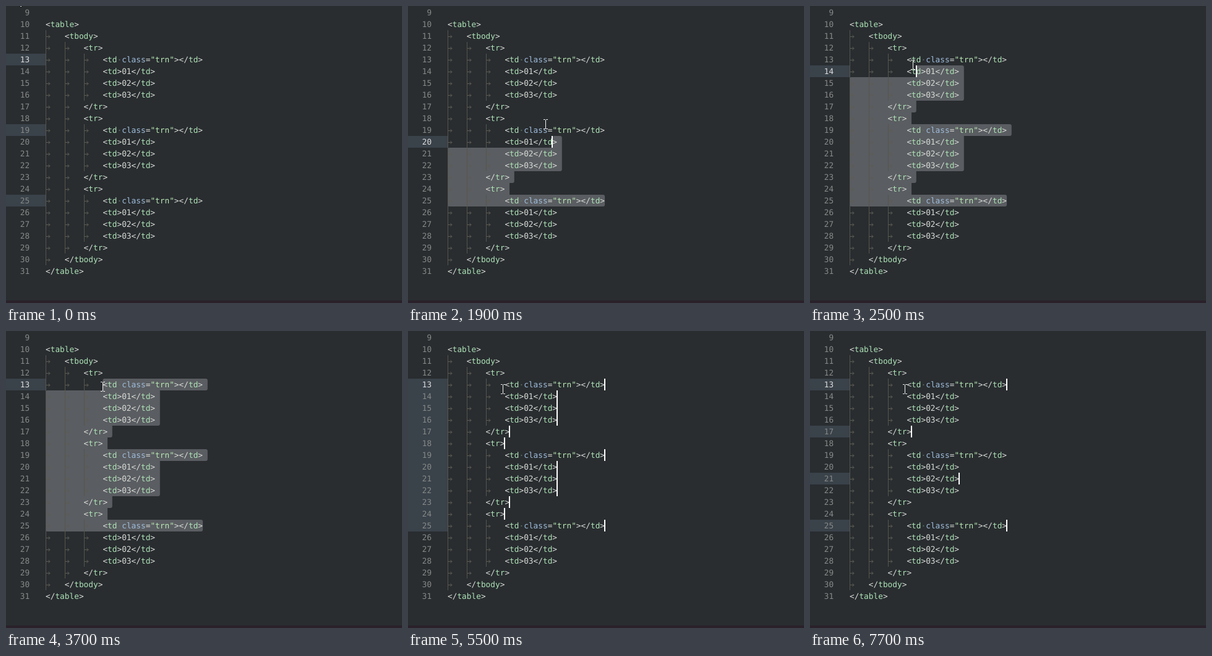
An HTML page for the animation above (8000 ms loop, 640 px wide and 480 px high).

```html
<!DOCTYPE html>
<html lang="en">
<head>
<meta charset="utf-8">
<title>Splitting a selection into cursors</title>
<style>
  html, body { margin: 0; width: 100%; height: 100%; overflow: hidden; background: #292d30; }
  svg { display: block; width: 640px; height: 480px; }
  text {
    font: 12.79px "DejaVu Sans Mono", "Noto Sans Mono", monospace;
    text-rendering: geometricPrecision;
    white-space: pre;
    fill: #d8dbd6;
  }
  .tag { fill: #aee4b7; }
  .attr { fill: #9fbcdc; }
  .str { fill: #b8e8b4; }
  .num { fill: #878a87; text-anchor: end; }
  .num.active { fill: #dedede; }
  .guide { fill: #56554c; }
  .tab { fill: none; stroke: #5d5c53; }
  .dot { fill: #62706a; }
  #gutter { fill: #3a424a; }
  #selection { fill: #5a5d61; }
  #carets { fill: #fff; }
  #beam { fill: none; stroke: #f4f4f4; }
  #arrow { fill: #fff; stroke: #111; }
</style>
</head>
<body>
<svg viewBox="0 0 640 480">
  <rect y="476" width="640" height="4" fill="#2a212a"/>
  <path id="gutter"/>
  <path id="selection"/>
  <g id="code"></g>
  <path id="carets"/>
  <path id="beam" d="M-3.5 -7.5H-1L0 -6.5 1 -7.5H3.5M0 -7V7M-3.5 7.5H-1L0 6.5 1 7.5H3.5"/>
  <path id="arrow" d="M0 0V16L4 12.5 7 19 9.5 18 6.5 11.5H11Z"/>
</svg>
<script>
const LOOP = 8000, TICK = 100, BLINK = 470;
const PRESS = 1500, RELEASE = 3000, SPLIT = 5500, SPLIT_GAP = 730;
const LEFT = 64, CHAR = 7.7, ROW = 19, FIRST = 9, FROM = 13, TO = 25;
const $ = id => document.getElementById(id);
const clamp = (v, lo, hi) => Math.min(hi, Math.max(lo, v));

// Each line is [depth, text]; the first one is empty.
const group = [
  [2, '<tr>'], [3, '<td class="trn"></td>'],
  ...['01', '02', '03'].map(n => [3, `<td>${n}</td>`]),
  [2, '</tr>']
];
const lines = [[0, ''], [0, '<table>'], [1, '<tbody>'], ...group, ...group, ...group,
  [1, '</tbody>'], [0, '</table>']];

const rowTop = n => 1 + (n - FIRST) * ROW;
const colX = col => LEFT + col * CHAR;
const lineEnd = n => {
  const [depth, text] = lines[n - FIRST];
  return depth * 4 + text.length;
};

const span = (cls, text) => `<tspan class="${cls}">${text}</tspan>`;
const highlight = text =>
  text.replace(/(<\/?)(\w+)|(class)(=)("\w+")/g, (m, open, tag, attr, eq, str) =>
    tag ? open.replace('<', '&lt;') + span('tag', tag)
        : span('attr', attr) + eq + span('str', str));

function drawLine([depth, text], i) {
  const n = FIRST + i, y = rowTop(n), base = y + 14;
  let out = `<text class="num" id="n${n}" x="38.2" y="${base}">${n}</text>`;
  for (let d = 0; d < depth; d++) {
    const x = Math.round(colX(d * 4));
    out += `<rect class="guide" x="${x}" y="${y}" width="1" height="${ROW}"/>` +
      `<path class="tab" d="M${x + 1} ${y + 10.5}h6m-2.5 -2.5l2.5 2.5 -2.5 2.5"/>`;
  }
  const space = text.indexOf(' ');
  if (space > 0)
    out += `<circle class="dot" cx="${colX(depth * 4 + space + .5)}" cy="${y + 10}" r="1"/>`;
  return out + `<text x="${colX(depth * 4)}" y="${base}">${highlight(text)}</text>`;
}
$('code').innerHTML = lines.map(drawLine).join('');

// Key points of the pointer's path: time, x, y
const path = [
  [200, 16, -17], [300, 2, 8], [800, 361, 382], [1100, 333, 312], [1400, 333, 312],
  [1600, 309, 302], [1800, 237, 214], [2200, 176, 122], [2500, 166, 95],
  [2800, 158, 86], [3600, 158, 86], [3800, 153, 94]
];

function pointerAt(t) {
  const i = path.findIndex(([at]) => at > t);
  if (i < 1) return path.at(i).slice(1);
  const [t0, ...a] = path[i - 1], [t1, ...b] = path[i];
  return a.map((v, k) => v + (b[k] - v) * (t - t0) / (t1 - t0));
}

// The editor's caret trails the pointer by one tick.
function draggedCaret(t) {
  const [x, y] = pointerAt(t - TICK);
  const row = clamp(FIRST + Math.floor((y - 1) / ROW), FROM, TO);
  const col = clamp(Math.round((x - LEFT) / CHAR), 0, lineEnd(row));
  return { row, col };
}

function everyNth(step) {
  const carets = [];
  for (let row = FROM; row <= TO; row += step) carets.push({ row, col: lineEnd(row) });
  return carets;
}

function editorAt(t) {
  if (t < PRESS) return { carets: everyNth(6), since: -BLINK };
  if (t < SPLIT) return { carets: [draggedCaret(t)], since: RELEASE, selecting: true };
  const splits = Math.floor((t - SPLIT) / SPLIT_GAP);
  return { carets: everyNth(splits + 1), since: SPLIT + splits * SPLIT_GAP };
}

function selectionPath({ row, col }) {
  if (row === TO && col === lineEnd(TO)) return '';
  const boxes = [];
  for (let n = row; n <= TO; n++)
    boxes.push([colX(n === row ? col : 0), colX(lineEnd(n) + (n < TO ? 1 : 0)), rowTop(n)]);
  return boxes.map(([l, r, y], i) => {
    const up = boxes[i - 1], down = boxes[i + 1], b = y + ROW;
    const tl = !up || up[0] > l ? 3 : 0, tr = !up || up[1] < r ? 3 : 0;
    const bl = !down ? 3 : 0, br = !down || down[1] < r ? 3 : 0;
    return `M${l + tl} ${y}H${r - tr}Q${r} ${y} ${r} ${y + tr}V${b - br}` +
      `Q${r} ${b} ${r - br} ${b}H${l + bl}Q${l} ${b} ${l} ${b - bl}V${y + tl}Q${l} ${y} ${l + tl} ${y}Z`;
  }).join('');
}

function drawEditor(t) {
  const { carets, since, selecting } = editorAt(t);
  const lit = t < since || Math.floor((t - since) / BLINK) % 2 === 0;
  const bars = carets.map(({ row, col }) =>
    `M${Math.round(colX(col)) - 1} ${rowTop(row)}h2v${ROW}h-2Z`);
  const marks = carets.map(({ row }) => `M0 ${rowTop(row)}h${LEFT}v${ROW}H0Z`);
  $('carets').setAttribute('d', lit ? bars.join('') : '');
  $('gutter').setAttribute('d', marks.join(''));
  $('selection').setAttribute('d', selecting ? selectionPath(carets[0]) : '');
  lines.forEach((_, i) =>
    $('n' + (FIRST + i)).classList.toggle('active', FIRST + i === carets[0].row));
}

function drawPointer(t) {
  const [x, y] = pointerAt(t).map(Math.round);
  const overText = x > LEFT;
  $('beam').style.display = overText ? '' : 'none';
  $('arrow').style.display = overText ? 'none' : '';
  $(overText ? 'beam' : 'arrow').setAttribute('transform', `translate(${x + .5} ${y})`);
}

const start = performance.now();
let shown;
function frame() {
  const t = Math.floor((performance.now() - start) % LOOP / TICK) * TICK;
  if (t !== shown) {
    drawEditor(t);
    drawPointer(t);
    shown = t;
  }
  requestAnimationFrame(frame);
}
frame();
</script>
</body>
</html>
```
